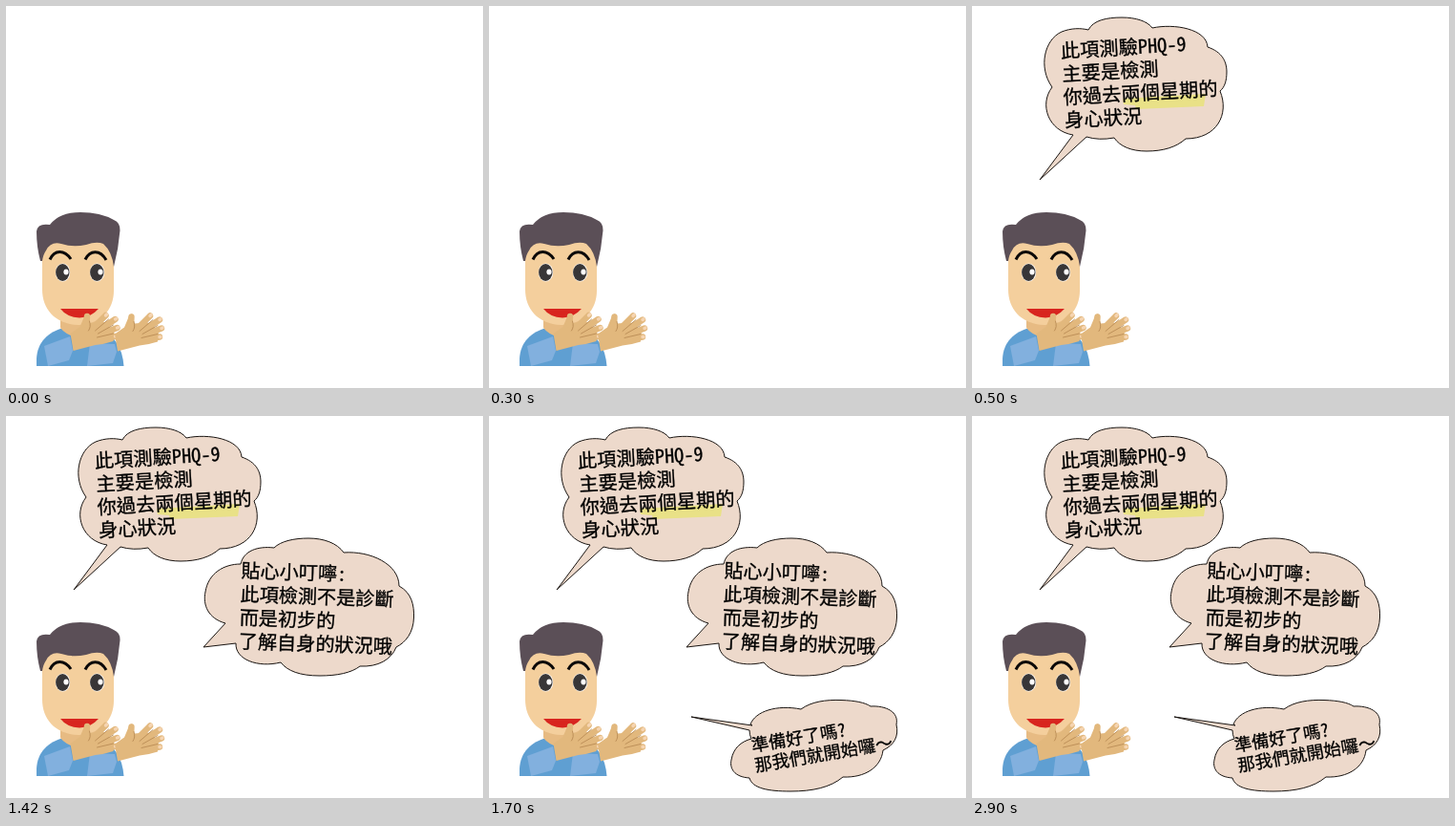
Animation, 500 px wide and 400 px high, one loop 3.7 s. Source, as an HTML page:

```html
<!DOCTYPE html>
<html lang="zh-Hant">
<head>
<meta charset="utf-8">
<style>
html, body { margin: 0; width: 100%; height: 100%; overflow: hidden; background: #fff; }
svg { display: block; width: 100vw; height: 100vh; }
text {
  font-family: "Noto Sans Mono CJK TC", "Noto Sans CJK TC", "Noto Sans CJK", "Noto Sans Mono CJK JP", "Noto Sans CJK JP", monospace;
  font-weight: 500; fill: #000; stroke: #000; stroke-width: .3; white-space: pre;
}
.cloud { fill: #edd9cb; stroke: #1a1512; stroke-width: 1; stroke-linejoin: round; }
.bubble { visibility: hidden; }
.line { fill: none; stroke-linecap: round; stroke-linejoin: round; }
</style>
</head>
<body>
<svg viewBox="0 0 500 400">
  <defs>
    <g id="eye">
      <ellipse rx="7.7" ry="9.5" fill="#fff"/>
      <ellipse cx="-.2" rx="7.2" ry="8.9" fill="#383637"/>
      <ellipse cx="3.5" cy="-.6" rx="2.6" ry="3" fill="#fff"/>
    </g>
    <g id="hand">
      <path d="M0 -6 L10 -13 L15 -25 Q18 -29 20 -25 L20 -17 L35 -18 L46 -9 L45 2 Q36 5 26 6 L3 12 Z" fill="#e2b87d"/>
      <g class="line" stroke="#e2b87d" stroke-width="6.4">
        <path d="M17 -15 L17.500 -24"/>
        <path d="M22 -10 L37 -25"/>
        <path d="M27 -8 L47 -21"/>
        <path d="M28 -4 L49 -12"/>
        <path d="M27 0 L47 -3"/>
      </g>
      <g class="line" stroke="#b98c55" stroke-width=".9">
        <path d="M26 -9 L40 -21"/>
        <path d="M29 -6 L45 -15"/>
        <path d="M28 -2 L45 -6"/>
        <path d="M20 -19 Q22 -13 19 -9"/>
      </g>
      <g class="line" stroke="#f6d5b2" stroke-width="3.400">
        <path d="M37 -25 l1 -1"/>
        <path d="M47 -21 l1 -.7"/>
        <path d="M49 -12 l1 -.4"/>
        <path d="M47 -3 l1 0"/>
      </g>
    </g>
  </defs>
  <rect width="500" height="400" fill="#fff"/>

  <g id="man">
    <path d="M32 377 V369 C33 352 44 341 61 337 L97 337 C113 344 122 357 123.500 377 Z" fill="#5f9fd2"/>
    <path d="M57 326 H96 V339 Q84 350 74 347 Q62 344 57 337 Z" fill="#e7bb83"/>
    <path d="M38 262 Q40 242 58 243 H98 Q113 247 113 268 V298 C113 318 100 333 76 334 C50 333 38 316 38 297 Z" fill="#f4cf9d"/>
    <path d="M36 267 Q32 252 32 236 Q33 227 46 229 Q56 216 78 216 Q99 216 113 224 Q120 227 119.500 235 Q118 254 113 273 Q111 257 102 249 Q95 246 84 250 Q70 253 58 249 Q47 246 42 256 Q39 260 38 267 Z" fill="#5b4f57"/>
    <g class="line" stroke="#0b0909" stroke-width="3" style="stroke-linecap:butt">
      <path d="M46 265.500 C51 255 61 255 68 265"/>
      <path d="M83 265.500 C88 255 99 255 105 266"/>
    </g>
    <use href="#eye" x="59.500" y="279"/>
    <use href="#eye" x="95.500" y="279"/>
    <path d="M57 317 H97 Q89 326 77 326.500 Q64 326 57 317 Z" fill="#d8251f"/>
    <path d="M40 356 L67 346 L70 361 L66 371 L44 377 Z" fill="#82b0de"/>
    <path d="M88 353 L114 354 L116 362 L112 374 L85 377 Z" fill="#82b0de"/>
    <use href="#hand" x="67.500" y="349"/>
    <use href="#hand" x="114" y="349.500"/>
  </g>

  <g class="bubble" data-at="500">
    <path class="cloud" d="M94 27 C104 23 114 23 122 25 C127 15 141 12 157 12 C172 12 184 16 189 23 C212 18 246 24 247 43 C262 48 267 58 267 69 C267 78 265 85 260 89 C270 113 257 139 224 139 C214 148 200 152 183 152 C167 152 155 147 149 138 Q133 141 120 137 L71 182 L106 135 C80 131 70 103 84 85 C69 64 76 35 94 27 Z"/>
    <path d="M158 97 L245 92 L243 105 L172 108 L171 104 L159 103 Z" fill="#e9e187"/>
    <g transform="translate(93.300 54.600) rotate(-3.300)" font-size="20.300" data-step="24.200"
       data-text="此項測驗PHQ-9|主要是檢測|你過去兩個星期的|身心狀況"></g>
  </g>

  <g class="bubble" data-at="1000">
    <path class="cloud" d="M246 155 C249 141 264 136 281 138 C288 131 302 128 317 128 C333 128 347 133 354 143 C382 141 412 155 412 178 C425 185 428 198 427.500 211 C427 227 419 237 409 242 C404 255 390 263 371 262 C362 269 347 272 329 272 C308 272 295 267 288 258 C264 264 240 255 241 238 L207 242 L230 217 C212 212 206 198 209 184 C212 165 228 155 246 155 Z"/>
    <g transform="translate(246.200 169) rotate(2)" font-size="20.150" data-step="24.700"
       data-text="貼心小叮嚀:|此項檢測不是診斷|而是初步的|了解自身的狀況哦"></g>
  </g>

  <g class="bubble" data-at="1700">
    <path class="cloud" d="M274 323 C279 309 302 302 327 307 C338 299 353 297 369 297.500 C384 298 394 300 400 304 C416 303 430 310 427 323 C430 336 424 345 413 350 C411 368 394 379 371 378 C358 389 339 393 316 393 C293 393 276 390 273 379 C257 378 252 369 254 360 C256 348 264 341 275 338 Q273 334 273 329 L212 315 L276 324 Z"/>
    <g transform="translate(276.200 351.800) rotate(-9.700)" font-size="18.300" data-step="21.200"
       data-text="準備好了嗎?|那我們就開始囉～"></g>
  </g>
</svg>
<script>
const LOOP = 3700;
const NS = "http://www.w3.org/2000/svg";
const bubbles = [...document.querySelectorAll(".bubble")];

for (const block of document.querySelectorAll("[data-text]")) {
  block.dataset.text.split("|").forEach((words, row) => {
    const line = document.createElementNS(NS, "text");
    line.setAttribute("y", row * block.dataset.step);
    line.textContent = words;
    block.append(line);
  });
}

function draw(time) {
  for (const bubble of bubbles) {
    bubble.style.visibility = time >= +bubble.dataset.at ? "visible" : "hidden";
  }
}

const start = performance.now();
function tick() {
  draw((performance.now() - start) % LOOP);
  requestAnimationFrame(tick);
}
tick();
</script>
</body>
</html>
```
